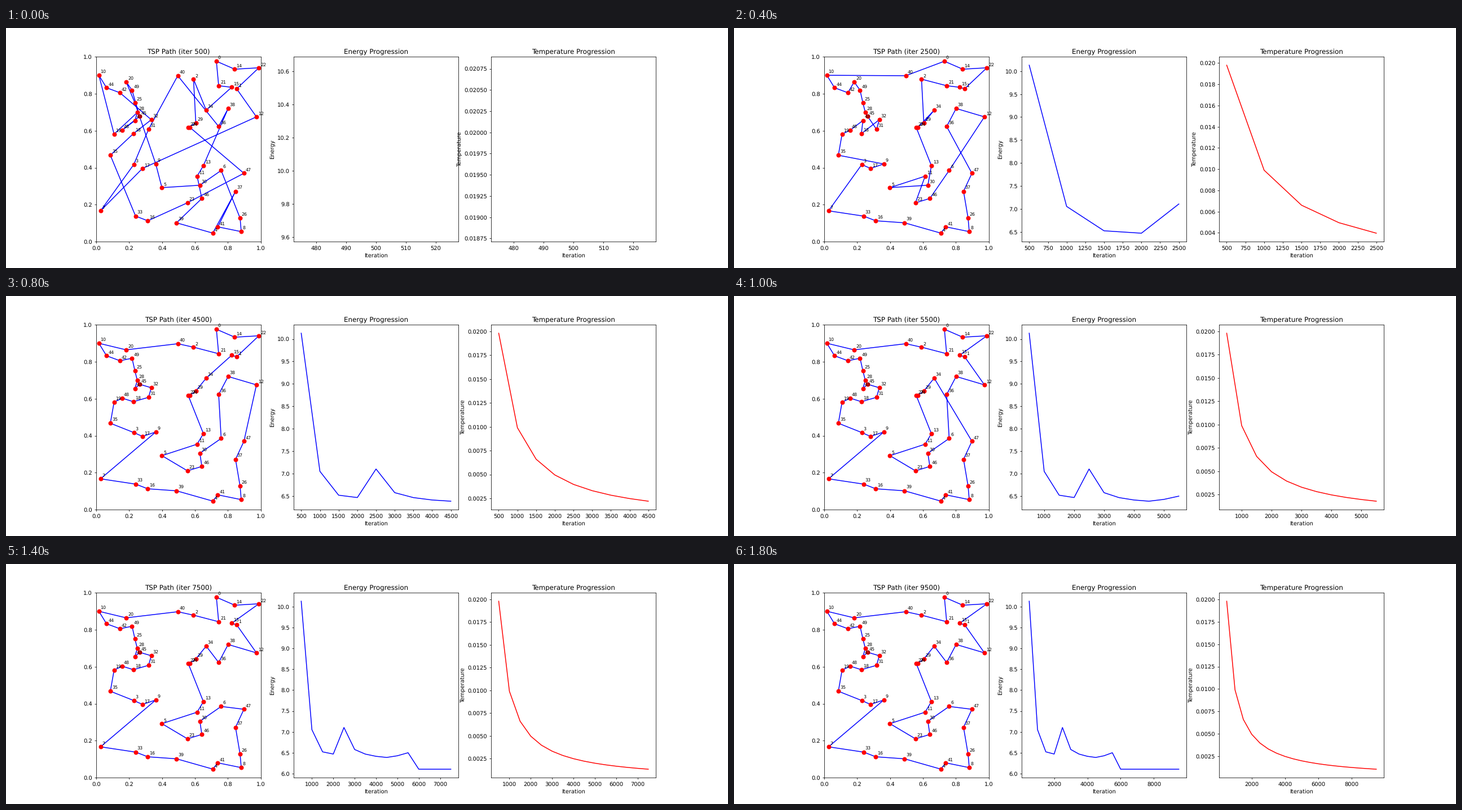
Recreate the animation shown at these times as a matplotlib script. Size 1280 by 427 pixels, loop 1.9 s.

```python
import itertools

import numpy as np
import matplotlib.pyplot as plt
from matplotlib.animation import FuncAnimation

STEP = 500
FRAMES = 19
ITERS = STEP * np.arange(1, FRAMES + 1)

CITIES = np.array([
    (.730, .976), (.853, .827), (.591, .879), (.228, .417), (.708, .046),
    (.399, .292), (.759, .385), (.026, .1665), (.881, .054), (.3616, .420),
    (.016, .900), (.613, .354), (.9734, .675), (.651, .411), (.8414, .933),
    (.8226, .835), (.3133, .1126), (.281, .396), (.2255, .584), (.1083, .5816),
    (.1817, .8645), (.7438, .8435), (.988, .9405), (.554, .210), (.569, .618),
    (.235, .7504), (.874, .127), (.5587, .618), (.2495, .6985), (.605, .642),
    (.6296, .305), (.3177, .6075), (.3345, .6595), (.239, .138), (.668, .7115),
    (.0857, .4673), (.7438, .623), (.8463, .272), (.8013, .7203), (.4877, .1017),
    (.4953, .8976), (.7386, .0798), (.144, .8055), (.2348, .655), (.0624, .8325),
    (.2636, .678), (.6416, .2334), (.8973, .3697), (.1573, .603), (.2176, .819),
])
N = len(CITIES)
DIST = np.linalg.norm(CITIES[:, None] - CITIES[None], axis=2)

# Corner cities of the tangled, half-sorted and settled tours.
TANGLED = [0, 22, 1, 12, 7, 40, 36, 38, 46, 39, 4, 37, 41, 26, 6, 30, 5, 9, 25,
           20, 49, 45, 48, 43, 28, 19, 10, 44, 32, 35, 33, 47, 27, 2, 34, 15, 21]
HALFWAY = [13, 30, 5, 11, 23, 12, 36, 8, 7, 3, 9, 35, 43,
           18, 32, 31, 49, 20, 10, 0, 22, 21, 2, 29, 34, 27]
SETTLED = [0, 22, 12, 36, 27, 13, 5, 46, 6, 8, 7,
           9, 17, 35, 18, 32, 43, 49, 44, 10, 40, 21]
HALFWAY_ITER = 2500
SETTLED_ITER = 8500


def tour_edges(tour):
    return list(zip(tour, tour[1:] + tour[:1]))


def tour_length(tour):
    return sum(DIST[a, b] for a, b in tour_edges(tour))


def complete(corners):
    """Add the missing cities, always the one with the smallest detour."""
    tour = list(corners)
    missing = set(range(N)) - set(tour)
    while missing:
        _, city, at = min(
            (DIST[a, c] + DIST[c, b] - DIST[a, b], c, i + 1)
            for i, (a, b) in enumerate(tour_edges(tour)) for c in missing)
        tour.insert(at, city)
        missing.remove(city)
    return tour


def untangle(tour, goal):
    """List the tours on the way to goal, reversing one stretch at a time."""
    wanted = {frozenset(edge) for edge in tour_edges(goal)}

    def in_goal(a, b):
        return frozenset((a, b)) in wanted

    tours = [tour]
    while True:
        best = None
        for i, j in itertools.combinations(range(N), 2):
            a, b = tour[i], tour[i + 1]
            c, d = tour[j], tour[(j + 1) % N]
            if b == c or a == d:
                continue
            won = in_goal(a, c) + in_goal(b, d) - in_goal(a, b) - in_goal(c, d)
            change = DIST[a, c] + DIST[b, d] - DIST[a, b] - DIST[c, d]
            useful = won > 0 or (won == 0 and change < -1e-9)
            if useful and (best is None or change < best[0]):
                best = change, i + 1, j + 1
        if best is None:
            return tours + [goal]
        _, lo, hi = best
        tour = tour[:lo] + tour[lo:hi][::-1] + tour[hi:]
        tours.append(tour)


def pick(tours, t):
    return tours[int(t * (len(tours) - 1))]


def build_tours():
    start, middle, end = map(complete, (TANGLED, HALFWAY, SETTLED))
    hot = untangle(start, middle)
    cold = untangle(middle, end)
    tours = []
    for it in ITERS:
        if it < HALFWAY_ITER:
            tours.append(pick(hot, (it - STEP) / (HALFWAY_ITER - STEP)))
        else:
            t = min(1, (it - HALFWAY_ITER) / (SETTLED_ITER - HALFWAY_ITER))
            tours.append(pick(cold, 1 - (1 - t) ** 4))
    return tours


TOURS = build_tours()
ENERGY = [tour_length(tour) for tour in TOURS]
TEMPERATURE = 1 / (0.101 * ITERS)

plt.rcParams["text.hinting"] = "none"
fig, (path_ax, energy_ax, temp_ax) = plt.subplots(
    1, 3, figsize=(18, 6.0046875), dpi=640 / 9)


def draw_path(i):
    path_ax.clear()
    loop = CITIES[TOURS[i] + TOURS[i][:1]]
    path_ax.plot(loop[:, 0], loop[:, 1], "b-")
    path_ax.scatter(CITIES[:, 0], CITIES[:, 1], c="red", s=50, zorder=2.5)
    for n, (x, y) in enumerate(CITIES):
        path_ax.text(x + 0.01, y + 0.01, str(n), fontsize=8)
    path_ax.set(xlim=(0, 1), ylim=(0, 1), title=f"TSP Path (iter {ITERS[i]})")


def draw_curve(ax, values, i, color, name):
    ax.clear()
    ax.plot(ITERS[:i + 1], values[:i + 1], color=color)
    ax.set(title=f"{name} Progression", xlabel="Iteration", ylabel=name)


def update(i):
    draw_path(i)
    draw_curve(energy_ax, ENERGY, i, "blue", "Energy")
    draw_curve(temp_ax, TEMPERATURE, i, "red", "Temperature")


anim = FuncAnimation(fig, update, frames=FRAMES, interval=100, repeat=True,
                     repeat_delay=0)
plt.show()
```
